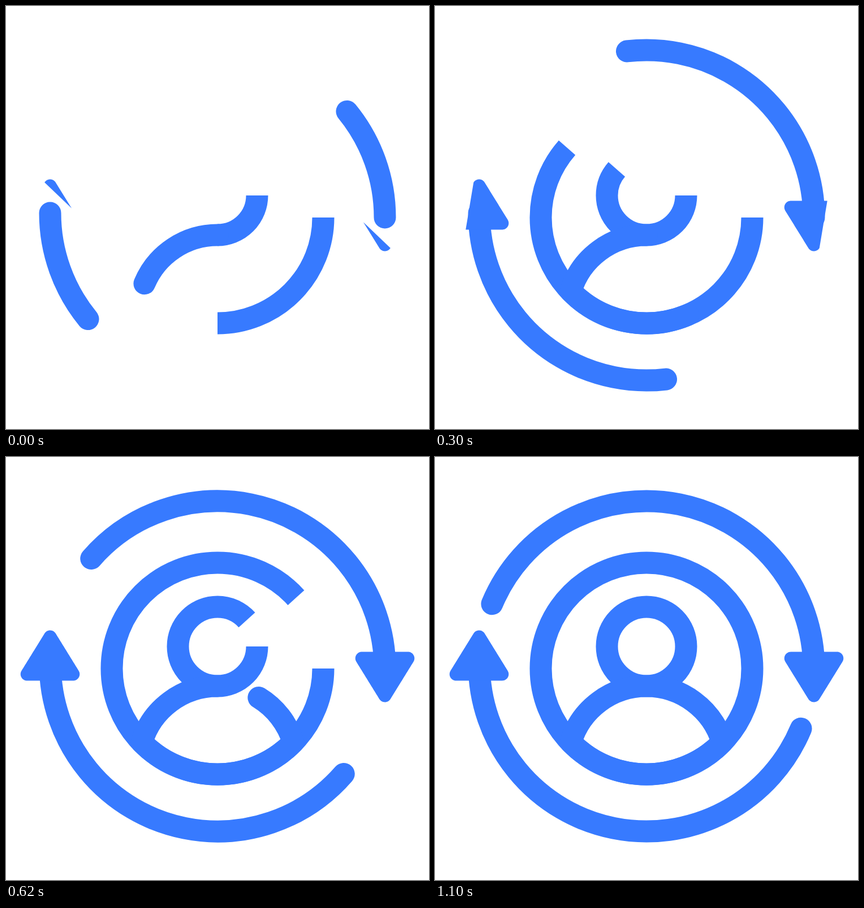
Animation of 748x748 px, one loop 1.6 s. Source, as an HTML page:

```html
<!DOCTYPE html>
<html lang="en">
<head>
<meta charset="utf-8">
<title>User refresh icon</title>
<style>
  html, body { margin: 0; width: 100%; height: 100%; overflow: hidden; background: #fff; }
  svg { display: block; width: 100vw; height: 100vh; }
  .line { fill: none; stroke: #377aff; stroke-width: 39; }
  .round { stroke-linecap: round; stroke-linejoin: round; }
  .head { fill: #377aff; }
</style>
</head>
<body>
<svg viewBox="0 0 748 748">
  <defs>
    <path id="outline" d="M679.8 428A11.5 11.5 0 0 1 660.2 428L619.4 362A11.5 11.5 0 0 1 629.2 344.5H710.8A11.5 11.5 0 0 1 720.6 362Z"/>
  </defs>
  <circle class="line" cx="374" cy="374" r="187" pathLength="1"/>
  <circle class="line" cx="374" cy="335" r="70" pathLength="1"/>
  <path class="line round" pathLength="1" d="M374 405A140 140 0 0 0 240 504.4A186.5 186.5 0 0 0 508 504.4A140 140 0 0 0 374 405"/>
  <g id="arrow">
    <path class="line round" pathLength="1" d="M670 374A296 296 0 0 0 100.9 259.8"/>
    <polygon class="head"/>
  </g>
  <use href="#arrow" transform="rotate(180 374 370)"/>
</svg>
<script>
  const LOOP = 1600, DRAW = 1100, STEP = 20, START = 0.25;
  const lines = document.querySelectorAll('.line');
  const head = document.querySelector('.head');
  const outline = document.getElementById('outline');
  const outlineLength = outline.getTotalLength();

  const bezier = (a, b, s) => 3 * (1 - s) * (1 - s) * s * a + 3 * (1 - s) * s * s * b + s * s * s;

  function ease(x) {
    let lo = 0, hi = 1;
    for (let i = 0; i < 30; i++) {
      const mid = (lo + hi) / 2;
      if (bezier(0.21, 0.4, mid) < x) lo = mid; else hi = mid;
    }
    return bezier(0.3, 1, lo);
  }

  // The arrowhead fills the part of its outline drawn so far, closed by a chord.
  function trimmed(p) {
    const count = 160, points = [];
    for (let i = 0; i <= count; i++) {
      const { x, y } = outline.getPointAtLength(outlineLength * p * i / count);
      points.push(x.toFixed(2) + ',' + y.toFixed(2));
    }
    return points.join(' ');
  }

  function draw(now) {
    const t = Math.floor((now % LOOP + 0.01) / STEP) * STEP;
    const p = t >= DRAW ? 1 : START + (1 - START) * ease(t / DRAW);
    const dash = p < 1 ? p + ' 2' : 'none';
    lines.forEach(line => line.setAttribute('stroke-dasharray', dash));
    head.setAttribute('points', trimmed(p));
  }

  function tick(now) {
    draw(now);
    requestAnimationFrame(tick);
  }

  draw(0);
  requestAnimationFrame(tick);
</script>
</body>
</html>
```
